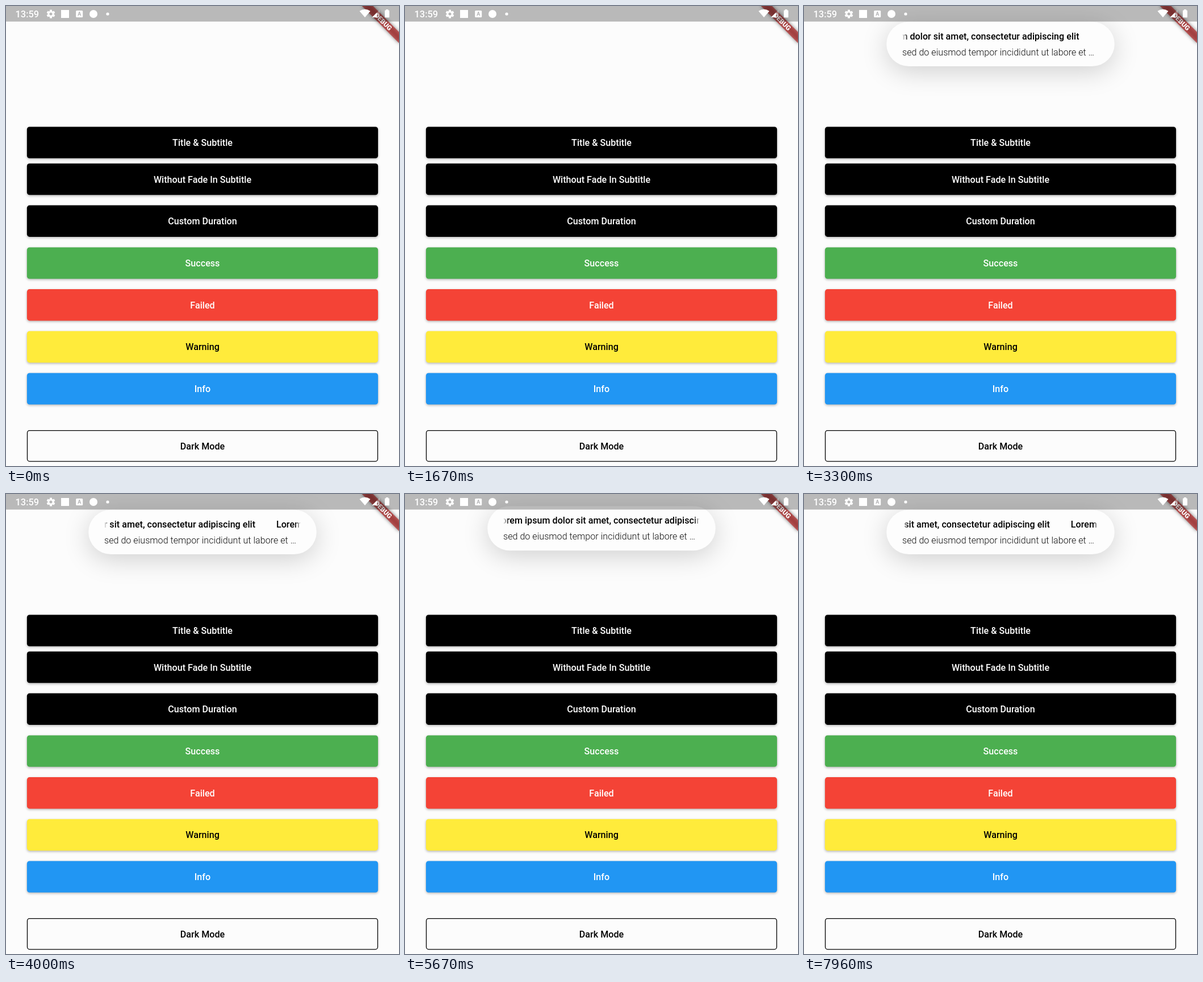
An HTML page with a canvas that plays this animation: 692 px wide and 809 px high, repeating every 8 s.

```html
<!DOCTYPE html>
<html lang="en">
<head>
<meta charset="utf-8">
<title>Toast demo</title>
<style>
  html, body { margin: 0; width: 100%; height: 100%; overflow: hidden; background: #fcfcfc; }
  canvas { display: block; width: 692px; height: 809px; }
</style>
</head>
<body>
<canvas id="stage" width="692" height="809"></canvas>
<script>
const ctx = document.getElementById('stage').getContext('2d');
const W = 692, H = 809, LOOP = 8000;
const DP = W / 600; // screen is 600 logical units wide
const FONT = 'Roboto, sans-serif';
const BODY = 14 * DP;

const TITLE = 'Lorem ipsum dolor sit amet, consectetur adipiscing elit';
const SUBTITLE = 'sed do eiusmod tempor incididunt ut labore et …';
const GAP = 32 * DP;

const BUTTONS = [
  { label: 'Title & Subtitle', y: 212.4, fill: '#000' },
  { label: 'Without Fade In Subtitle', y: 277, fill: '#000', press: [1880, 2760] },
  { label: 'Custom Duration', y: 350.6, fill: '#000' },
  { label: 'Success', y: 424.4, fill: '#4caf50' },
  { label: 'Failed', y: 498.1, fill: '#f44336' },
  { label: 'Warning', y: 571.8, fill: '#ffeb3b', ink: '#000', press: [4720, 5520] },
  { label: 'Info', y: 645.4, fill: '#2196f3' }
];

// scroll: [time, distance] points of the moving title
const TOASTS = [
  { enter: 1950, leave: 4750, scroll: [[1950, 0], [2590, 39], [4000, 130.6], [4960, 185.6], [5300, 205]] },
  { enter: 5400, leave: 9000, scroll: [[5450, 0], [6590, 62.7], [7960, 136.7], [8000, 139]] }
];
const ENTER_MS = 420, LEAVE_MS = 400, TRAVEL = 147;

const clamp = v => Math.min(1, Math.max(0, v));

function track(points, t) {
  let [t0, v0] = points[0];
  if (t <= t0) return v0;
  for (const [t1, v1] of points) {
    if (t <= t1) return v0 + (v1 - v0) * (t - t0) / (t1 - t0);
    [t0, v0] = [t1, v1];
  }
  return v0;
}

function shadow(color, blur, dy) {
  ctx.shadowColor = color;
  ctx.shadowBlur = blur;
  ctx.shadowOffsetY = dy;
}

function box(x, y, w, h, r) {
  ctx.beginPath();
  ctx.roundRect(x, y, w, h, r);
}

function shape(color, ...pts) {
  ctx.fillStyle = color;
  ctx.beginPath();
  pts.forEach(([x, y]) => ctx.lineTo(x, y));
  ctx.closePath();
  ctx.fill();
}

function disc(x, y, r) {
  ctx.beginPath();
  ctx.arc(x, y, r, 0, Math.PI * 2);
  ctx.fill();
}

function text(str, x, y, weight, size, color, align = 'left') {
  ctx.font = `${weight} ${size}px ${FONT}`;
  ctx.textAlign = align;
  ctx.fillStyle = color;
  ctx.fillText(str, x, y);
}

function drawButton({ label, y, fill, ink = '#fff', press }, t) {
  const x = 32 * DP, w = W - 2 * x, h = 48 * DP;
  ctx.save();
  shadow('rgba(0,0,0,0.3)', 4, 1.6);
  ctx.fillStyle = fill;
  box(x, y, w, h, 4 * DP);
  ctx.fill();
  ctx.restore();
  if (press) {
    const glow = Math.min(clamp((t - press[0]) / 100), clamp((press[1] - t) / 150));
    ctx.fillStyle = `rgba(255,255,255,${0.115 * glow})`;
    ctx.fill();
  }
  text(label, W / 2, y + h / 2 + 5.9, 500, BODY, ink, 'center');
}

function drawOutlined() {
  ctx.strokeStyle = '#000';
  ctx.lineWidth = 1.3;
  box(37.5, 746.6, 617, 54.2, 4);
  ctx.stroke();
  text('Dark Mode', W / 2, 780, 500, BODY, '#000', 'center');
}

function drawToast({ enter, leave, scroll }, t) {
  if (t < enter || t > leave + LEAVE_MS) return;
  const inn = 1 - clamp((t - enter) / ENTER_MS);
  const out = clamp((t - leave) / LEAVE_MS);
  const dy = -TRAVEL * (inn ** 3 + out ** 2);
  const x = 145.2, w = 401.6, left = 173, right = 519;

  ctx.save();
  ctx.translate(0, dy);
  ctx.save();
  shadow('rgba(0,0,0,0.18)', 46, 9);
  ctx.fillStyle = '#fdfdfd';
  box(x, 27.7, w, 78.3, 39.1);
  ctx.fill();
  ctx.restore();

  text(SUBTITLE, left, 86.8, 300, BODY, '#111');

  const edges = ctx.createLinearGradient(left, 0, right, 0);
  [[0, 0], [0.03, 1], [0.97, 1], [1, 0]].forEach(([p, a]) =>
    edges.addColorStop(p, `rgba(0,0,0,${a})`));
  ctx.beginPath();
  ctx.rect(left, 30, right - left, 36);
  ctx.clip();
  ctx.font = `500 ${BODY}px ${FONT}`;
  const period = ctx.measureText(TITLE).width + GAP;
  const start = left - track(scroll, t);
  text(TITLE, start, 59, 500, BODY, edges);
  text(TITLE, start + period, 59, 500, BODY, edges);
  ctx.restore();
}

function drawBanner() {
  ctx.save();
  ctx.translate(W, 0);
  ctx.rotate(Math.PI / 4);
  ctx.scale(DP, DP);
  ctx.filter = 'blur(3px)';
  ctx.fillStyle = 'rgba(0,0,0,0.5)';
  ctx.fillRect(-40, 28, 80, 12);
  ctx.filter = 'none';
  ctx.fillStyle = 'rgba(183,28,28,0.63)';
  ctx.fillRect(-40, 28, 80, 12);
  text('DEBUG', 0, 37.6, 900, 10.2, '#fff', 'center');
  ctx.restore();
}

function drawGear(x, y) {
  ctx.save();
  ctx.translate(x, y);
  for (let i = 0; i < 6; i++) {
    ctx.fillRect(-2, -7.4, 4, 4);
    ctx.rotate(Math.PI / 3);
  }
  ctx.beginPath();
  ctx.arc(0, 0, 5.6, 0, Math.PI * 2);
  ctx.arc(0, 0, 2.5, 0, Math.PI * 2, true);
  ctx.fill();
  ctx.restore();
}

function drawStatusBar() {
  ctx.fillStyle = 'rgba(0,0,0,0.267)';
  ctx.fillRect(0, 0, W, 27.4);
  text('13:59', 16.5, 20, 500, 16.4, '#fff');

  drawGear(79, 14);
  ctx.fillRect(97, 7, 14, 14);
  box(123.2, 8, 12, 12, 1.5);
  ctx.fill();
  text('A', 129.2, 17.3, 700, 9, '#b0b0b2', 'center');
  ctx.fillStyle = '#fff';
  disc(154, 14, 7);
  disc(179, 14, 2.6);

  // wifi fan
  ctx.beginPath();
  ctx.moveTo(632, 20);
  ctx.lineTo(622.5, 9);
  ctx.quadraticCurveTo(632, 2.5, 641.5, 9);
  ctx.fill();
  // partly filled signal wedge
  shape('rgba(255,255,255,0.3)', [644.5, 20], [658, 6.5], [658, 20]);
  shape('#fff', [644.5, 20], [653, 11.5], [653, 20]);
  // battery
  box(667, 7.4, 8, 12.8, 1);
  ctx.fill();
  ctx.fillRect(669, 6, 4, 2);
}

function draw(t) {
  ctx.fillStyle = '#fcfcfc';
  ctx.fillRect(0, 0, W, H);
  BUTTONS.forEach(b => drawButton(b, t));
  drawOutlined();
  TOASTS.forEach(toast => drawToast(toast, t));
  drawBanner();
  drawStatusBar();
}

const begin = performance.now();
function tick() {
  draw((performance.now() - begin) % LOOP);
  requestAnimationFrame(tick);
}
tick();
</script>
</body>
</html>
```
